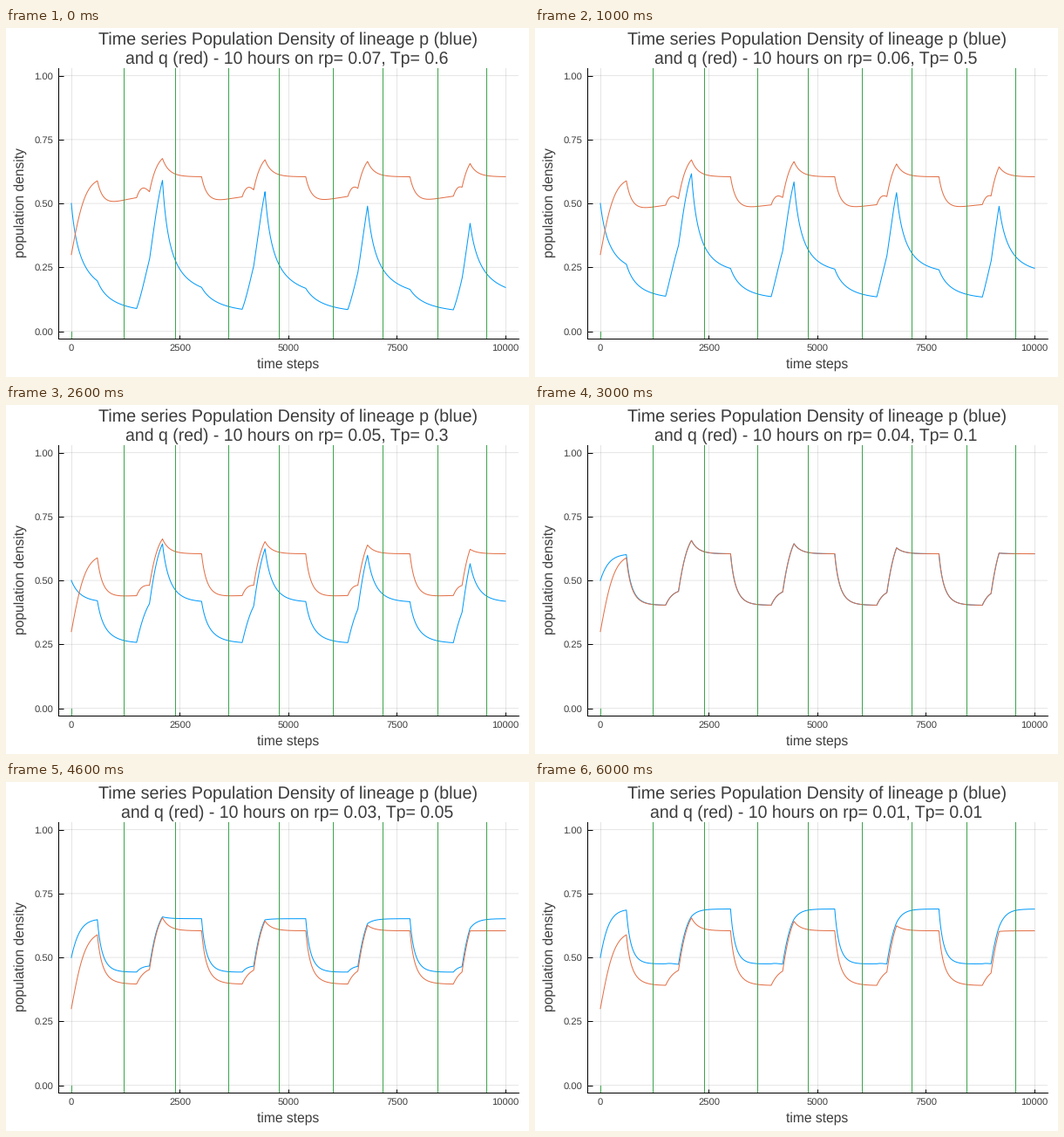
These frames come from a looping animation (600x400 px, 7000 ms). A matplotlib script:

```python
import numpy as np
import matplotlib
import matplotlib.pyplot as plt
from matplotlib.animation import FuncAnimation

matplotlib.rcParams["font.family"] = "Liberation Sans"
matplotlib.rcParams["text.hinting"] = "none"

W, H, DPI = 600, 400, 100
PX = 72 / DPI
BLUE, ORANGE, GREEN, INK = "#009AFA", "#E26F46", "#3DA44D", "#3C3C3C"

RATES = [0.07, 0.06, 0.05, 0.04, 0.03, 0.02, 0.01]
TOXINS = [0.6, 0.5, 0.3, 0.1, 0.05, 0.02, 0.01]
STEPS = 10000
GROWTH = 0.01
Q_TOXIN = 0.1


def capacity(toxin):
    return 0.699 - 0.947 * toxin


def toxin_free(t):
    """The toxin pauses in slowly narrowing windows."""
    return any(1504 + 2432 * k <= t < 2100 + 2362 * k for k in range(4))


def competing(t):
    return (t - 600) % 2400 < 1200


def simulate():
    """Run both lineages for every toxin level at once."""
    toxin = np.array(TOXINS)
    p = np.full(len(TOXINS), 0.5)
    q = np.full(len(TOXINS), 0.3)
    track_p, track_q = [p], [q]
    for t in range(STEPS):
        on = 0 if toxin_free(t) else 1
        loss = p * q / (p + q) if competing(t) else 0
        dp = GROWTH * p * (capacity(on * toxin) - p - loss)
        dq = GROWTH * q * (capacity(on * Q_TOXIN) - q - loss)
        p, q = p + dp, q + dq
        track_p.append(p)
        track_q.append(q)
    return np.array(track_p), np.array(track_q)


P, Q = simulate()
TIME = np.arange(STEPS + 1)

fig = plt.figure(figsize=(W / DPI, H / DPI), dpi=DPI, facecolor="white")
left, right, top, bottom = 60, 587.9, 45.8, 356.4
ax = fig.add_axes([left / W, 1 - bottom / H, (right - left) / W, (bottom - top) / H])
ax.set_xlim(-300, 10300)
ax.set_ylim(-0.03, 1.03)
ax.set_facecolor("white")


def label(x, y, text, size, **kw):
    """Text with its baseline at pixel (x, y), y counted from the top."""
    kw.setdefault("ha", "center")
    return fig.text(x / W, 1 - y / H, text, fontsize=size * PX, color=INK,
                    va="baseline", rotation_mode="anchor", **kw)


x_ticks = [0, 2500, 5000, 7500, 10000]
y_ticks = [0, 0.25, 0.5, 0.75, 1]
ax.set_xticks(x_ticks, [])
ax.set_yticks(y_ticks, [])
ax.tick_params(direction="in", width=PX, color="black")
ax.tick_params(axis="x", length=4 * PX)
ax.tick_params(axis="y", length=6 * PX)
ax.grid(color="black", alpha=0.1, linewidth=PX)
ax.set_axisbelow(True)
for line in ax.get_ygridlines():
    line.set_snap(False)
for side in ("top", "right"):
    ax.spines[side].set_visible(False)
for side in ("left", "bottom"):
    ax.spines[side].set_linewidth(PX)

for v in x_ticks:
    label(75 + v * 0.0498, 370, str(v), 11.2)
for v in y_ticks:
    label(54, 351.6 - v * 293, f"{v:.2f}", 11.2, ha="right")
label(323.5, 389.5, "time steps", 15.65)
label(21, 200.5, "population density", 15.65, rotation=90)
label(323.2, 19, "Time series Population Density of lineage p (blue)", 19.8)
subtitle = label(322.5, 41, "", 19.55)

line_p, = ax.plot([], [], color=BLUE, lw=PX, zorder=3)
line_q, = ax.plot([], [], color=ORANGE, lw=PX, zorder=3.1)

for k in range(4):
    for mark in (1210 + 2410 * k, 2390 + 2390 * k):
        ax.axvline(mark, color=GREEN, lw=PX, zorder=4)
ax.plot([0, 0], [0, -0.03], color=GREEN, lw=PX, zorder=4)


def draw(i):
    line_p.set_data(TIME, P[:, i])
    line_q.set_data(TIME, Q[:, i])
    subtitle.set_text(f"and q (red) - 10 hours on rp= {RATES[i]}, Tp= {TOXINS[i]}")
    return line_p, line_q, subtitle


anim = FuncAnimation(fig, draw, frames=len(TOXINS), interval=1000,
                     repeat=True, repeat_delay=0, blit=False)
plt.show()
```
